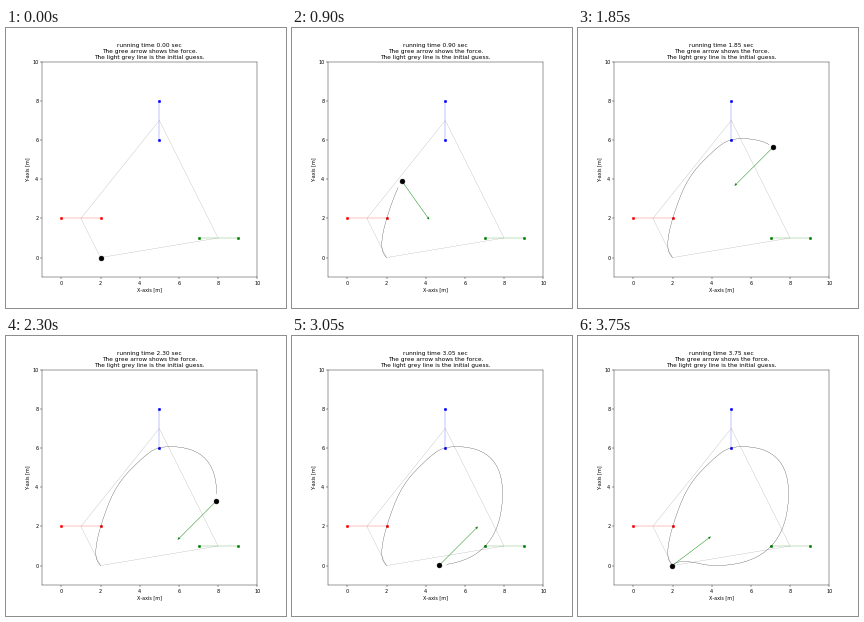
A matplotlib script that plays this animation: 280 by 280 pixels, repeating every 3800 ms.

```python
import numpy as np
import matplotlib.pyplot as plt
from matplotlib.animation import FuncAnimation

FRAMES = 76
ACC = 10.03      # acceleration under the full force
ARROW = 1.98     # arrow length of the full force
times = np.arange(FRAMES) * 0.05

# (end time, share of the full force): the force is constant in each phase
PHASES_X = [(0.18, -0.73), (1.05, 0.71), (1.319, -0.6), (1.62, 1),
            (3.016, -1), (3.785, 1)]
PHASES_Y = [(0.778, 1), (2.334, -1), (3.24, 1), (3.624, -0.65), (3.785, 0.75)]


def fly(pos, phases):
    """Position and force over time, starting at rest."""
    begin = speed = 0
    path, force = np.full(FRAMES, float(pos)), np.zeros(FRAMES)
    for end, share in phases:
        acc = ACC * share
        dt = times - begin
        path = np.where(dt > 0, pos + speed * dt + acc * dt ** 2 / 2, path)
        force = np.where(dt > 0, share, force)
        span = end - begin
        pos += speed * span + acc * span ** 2 / 2
        speed += acc * span
        begin = end
    return path, ARROW * force


xs, fx = fly(2, PHASES_X)
ys, fy = fly(0, PHASES_Y)

plt.rcParams["text.kerning_factor"] = 6
fig, ax = plt.subplots(figsize=(8, 8), dpi=35)
ax.set_xlim(-1, 10)
ax.set_ylim(-1, 10)
ax.set_aspect("equal")
ax.set_xlabel("X-axis [m]")
ax.set_ylabel("Y-axis [m]")

# gates and initial guess
for gx, gy, color in [((0, 2), (2, 2), "red"), ((5, 5), (6, 8), "blue"),
                      ((7, 9), (1, 1), "green")]:
    ax.plot(gx, gy, color=color, lw=0.5, marker="o", markersize=5)
ax.plot([2, 1, 5, 8, 2], [0, 2, 7, 1, 0], color="grey", lw=0.4)

trail, = ax.plot([], [], color="black", lw=0.5)
arrow = ax.quiver([2], [0], [0], [0], color="green", angles="xy",
                  scale_units="xy", scale=1, width=0.002, headwidth=6,
                  headlength=7, headaxislength=6, zorder=3)
ball, = ax.plot([], [], "o", color="black", markersize=10, zorder=4)


def update(k):
    ax.set_title(f"running time {times[k]:.2f} sec\n"
                 "The gree arrow shows the force.\n"
                 "The light grey line is the initial guess.")
    trail.set_data(xs[:k], ys[:k])
    ball.set_data([xs[k]], [ys[k]])
    # angles="xy" reads the tail position from XY
    arrow.XY = np.array([[xs[k], ys[k]]])
    arrow.set_offsets(arrow.XY)
    arrow.set_UVC([fx[k]], [fy[k]])
    return trail, ball, arrow


anim = FuncAnimation(fig, update, frames=FRAMES, interval=50,
                     repeat=True, repeat_delay=0, blit=False)
plt.show()
```
